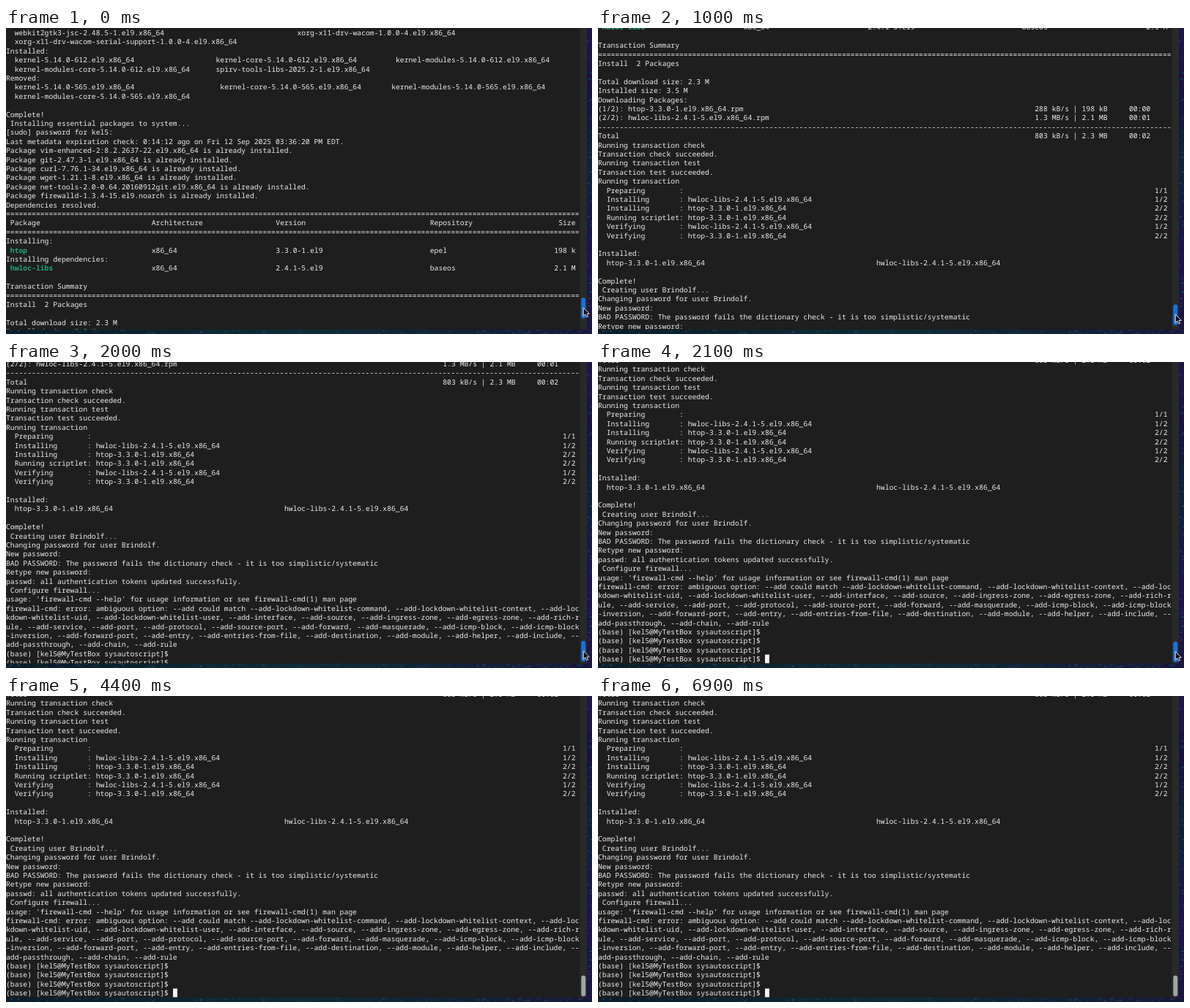
Recreate the animation shown at these times as an HTML page. Size 800 by 419 pixels, loop 7 s.

```html
<!DOCTYPE html>
<html lang="en">
<head>
<meta charset="utf-8">
<title>Terminal scroll</title>
<style>
html, body { margin: 0; width: 100%; height: 100%; overflow: hidden; background: #0a1420; }
svg { display: block; width: 800px; height: 419px; }
text {
  font: 9.743px "Noto Sans Mono", "DejaVu Sans Mono", monospace;
  fill: #ececec;
  white-space: pre;
  text-rendering: geometricPrecision;
  font-variant-ligatures: none;
}
.pkg { fill: #26a27a; font-weight: bold; }
</style>
</head>
<body>
<svg viewBox="0 0 800 419" xmlns="http://www.w3.org/2000/svg">
  <defs>
    <linearGradient id="side" x1="0" y1="0" x2="0" y2="1">
      <stop offset="0" stop-color="#1f1745"/>
      <stop offset=".2" stop-color="#17133c"/>
      <stop offset=".45" stop-color="#0f2338"/>
      <stop offset=".7" stop-color="#1d1546"/>
      <stop offset="1" stop-color="#1b1840"/>
    </linearGradient>
    <linearGradient id="base">
      <stop offset="0" stop-color="#0a1d28"/>
      <stop offset=".5" stop-color="#0c2c36"/>
      <stop offset="1" stop-color="#151a3a"/>
    </linearGradient>
    <clipPath id="pane"><rect width="783.5" height="412.5"/></clipPath>
  </defs>
  <rect y="412" width="800" height="7" fill="url(#base)"/>
  <rect x="793" width="7" height="419" fill="url(#side)"/>
  <g id="specks"></g>
  <rect width="793" height="412.8" fill="#1e1e1f"/>
  <rect x="783.5" width="9.5" height="412.8" fill="#29292b"/>
  <g clip-path="url(#pane)"><g id="page"></g></g>
  <rect id="thumb" x="785.3" width="6" height="28.5" rx="3"/>
  <path id="pointer" d="M0 0V11.2L2.6 8.9L4.4 12.8L6.3 12L4.6 8.2H8Z"
    fill="#080808" stroke="#f4f4f4" stroke-width=".9" stroke-linejoin="round"/>
</svg>
<script>
const COLS = 134, CHAR = 5.846, PITCH = 12.4, BASE = 9.9;
const LOOP = 7000, STEP = 100, END = 480.1;
const USER = "kel5", HOST = "MyTestBox", NEW_USER = "Brindolf";
const $ = id => document.getElementById(id);

// Places strings at columns: row(2, "a", 40, "b")
function row(...parts) {
  let line = "";
  for (let i = 0; i < parts.length; i += 2) line = line.padEnd(parts[i]) + parts[i + 1];
  return line;
}
const wrap = s => s.match(new RegExp(`.{1,${COLS}}`, "g"));
const already = name => `Package ${name} is already installed.`;
const action = (verb, name, count) => row(2, verb, 19, ": " + name, 130, count);

const HTOP = "htop-3.3.0-1.el9.x86_64";
const HWLOC = "hwloc-libs-2.4.1-5.el9.x86_64";
const RULE = "=".repeat(COLS);
const PROMPT = `(base) [${USER}@${HOST} sysautoscript]$ `;
const options = ("lockdown-whitelist-command lockdown-whitelist-context lockdown-whitelist-uid " +
  "lockdown-whitelist-user interface source ingress-zone egress-zone rich-rule service port " +
  "protocol source-port forward masquerade icmp-block icmp-block-inversion forward-port entry " +
  "entries-from-file destination module helper include passthrough chain rule")
  .split(" ").map(o => "--add-" + o).join(", ");

const lines = [
  row(2, "webkit2gtk3-jsc-2.48.5-1.el9.x86_64", 68, "xorg-x11-drv-wacom-1.0.0-4.el9.x86_64"),
  row(2, "xorg-x11-drv-wacom-serial-support-1.0.0-4.el9.x86_64"),
  "Installed:",
  row(2, "kernel-5.14.0-612.el9.x86_64", 49, "kernel-core-5.14.0-612.el9.x86_64",
    91, "kernel-modules-5.14.0-612.el9.x86_64"),
  row(2, "kernel-modules-core-5.14.0-612.el9.x86_64", 49, "spirv-tools-libs-2025.2-1.el9.x86_64"),
  "Removed:",
  row(2, "kernel-5.14.0-565.el9.x86_64", 50, "kernel-core-5.14.0-565.el9.x86_64",
    90, "kernel-modules-5.14.0-565.el9.x86_64"),
  row(2, "kernel-modules-core-5.14.0-565.el9.x86_64"),
  "",
  "Complete!",
  " Installing essential packages to system...",
  `[sudo] password for ${USER}:`,
  "Last metadata expiration check: 0:14:12 ago on Fri 12 Sep 2025 03:36:20 PM EDT.",
  ...["vim-enhanced-2:8.2.2637-22.el9.x86_64", "git-2.47.3-1.el9.x86_64",
    "curl-7.76.1-34.el9.x86_64", "wget-1.21.1-8.el9.x86_64",
    "net-tools-2.0-0.64.20160912git.el9.x86_64", "firewalld-1.3.4-15.el9.noarch"].map(already),
  "Dependencies resolved.",
  RULE,
  row(1, "Package", 34, "Architecture", 63, "Version", 99, "Repository", 129, "Size"),
  RULE,
  "Installing:",
  row(1, "htop", 34, "x86_64", 63, "3.3.0-1.el9", 99, "epel", 128, "198 k"),
  "Installing dependencies:",
  row(1, "hwloc-libs", 34, "x86_64", 63, "2.4.1-5.el9", 99, "baseos", 128, "2.1 M"),
  "",
  "Transaction Summary",
  RULE,
  "Install  2 Packages",
  "",
  "Total download size: 2.3 M",
  "Installed size: 3.5 M",
  "Downloading Packages:",
  row(0, `(1/2): ${HTOP}.rpm`, 102, "288 kB/s | 198 kB     00:00"),
  row(0, `(2/2): ${HWLOC}.rpm`, 102, "1.3 MB/s | 2.1 MB     00:01"),
  "-".repeat(COLS),
  row(0, "Total", 102, "803 kB/s | 2.3 MB     00:02"),
  "Running transaction check",
  "Transaction check succeeded.",
  "Running transaction test",
  "Transaction test succeeded.",
  "Running transaction",
  action("Preparing", "", "1/1"),
  action("Installing", HWLOC, "1/2"),
  action("Installing", HTOP, "2/2"),
  action("Running scriptlet", HTOP, "2/2"),
  action("Verifying", HWLOC, "1/2"),
  action("Verifying", HTOP, "2/2"),
  "",
  "Installed:",
  row(2, HTOP, 65, HWLOC),
  "",
  "Complete!",
  ` Creating user ${NEW_USER}...`,
  `Changing password for user ${NEW_USER}.`,
  "New password:",
  "BAD PASSWORD: The password fails the dictionary check - it is too simplistic/systematic",
  "Retype new password:",
  "passwd: all authentication tokens updated successfully.",
  " Configure firewall...",
  "usage: 'firewall-cmd --help' for usage information or see firewall-cmd(1) man page",
  ...wrap("firewall-cmd: error: ambiguous option: --add could match " + options),
  PROMPT, PROMPT, PROMPT, PROMPT
];

function add(parent, tag, attrs, content) {
  const el = document.createElementNS("http://www.w3.org/2000/svg", tag);
  for (const k in attrs) el.setAttribute(k, attrs[k]);
  if (content) el.textContent = content;
  parent.appendChild(el);
}

// Each run of text starts on its own column of the grid
lines.forEach((line, i) => {
  for (const run of line.matchAll(/\S+(?: \S+)*/g)) {
    const attrs = { x: run.index * CHAR, y: BASE + i * PITCH };
    if (run.index === 1 && /^(htop|hwloc-libs)$/.test(run[0])) attrs.class = "pkg";
    add($("page"), "text", attrs, run[0]);
  }
});
add($("page"), "rect", {
  x: PROMPT.length * CHAR, y: BASE + (lines.length - 1) * PITCH - 9.6,
  width: 5.9, height: 12.2, fill: "#f4f4f4"
});

let seed = 7;
const rand = () => (seed = seed * 16807 % 2147483647) / 2147483647;
for (let i = 0; i < 210; i++) {
  const side = i % 3 === 0;
  add($("specks"), "rect", {
    x: side ? 793 + rand() * 6 : rand() * 800,
    y: side ? rand() * 419 : 413 + rand() * 5,
    width: 1 + rand() * 3, height: 1 + rand(),
    fill: rand() < .6 ? "#1f5a60" : "#402a70", opacity: .3 + rand() * .4
  });
}

// Linear between [time, value] pairs
function track(keys, t) {
  const i = keys.findIndex(k => k[0] > t);
  if (i < 0) return keys[keys.length - 1][1];
  if (i === 0) return keys[0][1];
  const [t0, a] = keys[i - 1], [t1, b] = keys[i];
  return a + (b - a) * (t - t0) / (t1 - t0);
}
const scrollKeys = [[0, 0], [1000, 330], [1800, 390.6], [2100, END]];
const leaveKeys = [[2400, 0], [2800, 14]];

function draw(time) {
  const t = Math.floor(time % LOOP / STEP) * STEP;
  const scroll = track(scrollKeys, t);
  const top = 369.3 + 13.4 * scroll / END;
  $("page").setAttribute("transform", `translate(0 ${-scroll})`);
  $("thumb").setAttribute("y", top);
  $("thumb").setAttribute("fill", t < 2600 ? "#1c71d8" : "#a3a3a4");
  $("pointer").setAttribute("transform", `translate(${788.3 + track(leaveKeys, t)} ${top + 13.8})`);
}

const start = performance.now();
function tick() {
  draw(performance.now() - start);
  requestAnimationFrame(tick);
}
tick();
</script>
</body>
</html>
```
